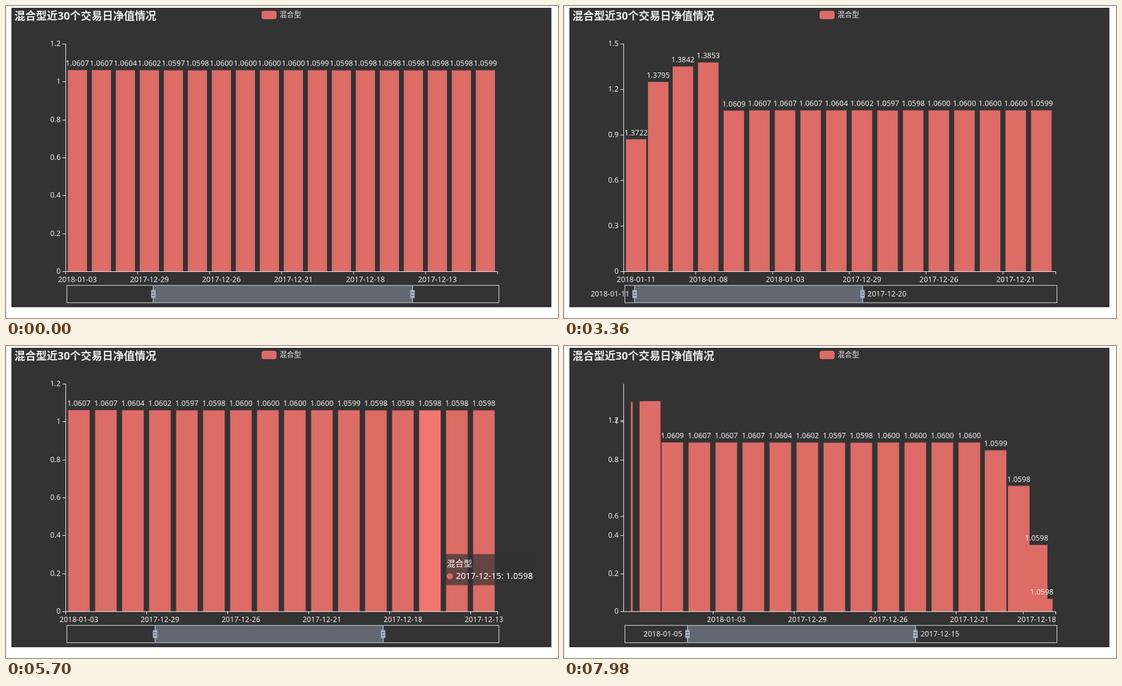
Recreate the animation shown at these times as an HTML page with a canvas. Size 920 by 521 pixels, loop 8000 ms.

```html
<!DOCTYPE html>
<html lang="zh">
<head>
<meta charset="utf-8">
<style>
  html, body { margin: 0; width: 100%; height: 100%; overflow: hidden; background: #fff; }
  canvas { display: block; }
</style>
</head>
<body>
<canvas id="stage" width="920" height="521"></canvas>
<script>
const g = document.getElementById('stage').getContext('2d');
const LOOP = 8000;
const X0 = 99, W = 720, Y0 = 443, H = 380;
const SLIDE = 101.5, MID = 481;
const RED = '#dd6b66', HOT = '#f37570', INK = '#eee', HANDLE = '#a7b7cc';
const FONT = '"Noto Sans", "Noto Sans CJK SC", "Noto Sans CJK", sans-serif';

const days = ('01-11 01-10 01-09 01-08 01-05 01-04 01-03 01-02 12-31 12-29 12-28 12-27 12-26 ' +
  '12-25 12-22 12-21 12-20 12-19 12-18 12-15 12-14 12-13 12-12 12-11 12-08 ' +
  '12-07 12-06 12-05 12-04 12-01').split(' ');
const date = i => (days[i] < '02' ? '2018-' : '2017-') + days[i];
const head = [1.3722, 1.3795, 1.3842, 1.3853, 1.0609, 1.0607, 1.0607, 1.0607, 1.0604, 1.0602, 1.0597, 1.0598];
const value = i => i < 12 ? head[i] : i < 16 ? 1.06 : i === 16 || i > 22 ? 1.0599 : 1.0598;

// Piecewise linear paths: time, value, time, value, ...
function path(p, t) {
  if (t <= p[0]) return p[1];
  for (let i = 2; i < p.length; i += 2) {
    if (t < p[i]) return p[i - 1] + (p[i + 1] - p[i - 1]) * (t - p[i - 2]) / (p[i] - p[i - 2]);
  }
  return p[p.length - 1];
}
const LEFT = [2560, 245.5, 2650, 228, 2758, 203, 2867, 178, 2975, 150, 3084, 127, 3193, 112.5,
  3270, 110.5, 3300, 112, 3360, 117.5, 3900, 166, 4175, 180, 4270, 244, 4340, 248.5,
  6240, 248.5, 6310, 242, 6380, 203, 6452, 184, 6524, 159, 6600, 130.5, 6680, 120, 6884, 108,
  6956, 103, 7000, 101.5, 7500, 101.5, 7660, 117, 7735, 128, 7810, 149, 7885, 174, 7960, 199,
  7980, 205.5, 8000, 211];
const RIGHT = [1440, 677.5, 1528, 686.5, 1680, 707.5, 1780, 709, 1900, 698, 2100, 667,
  2212, 648, 2340, 629.5, 2420, 625.5];
const left = t => path(LEFT, t);
const right = t => t < 2420 ? path(RIGHT, t) : left(t) + 380;

// Tooltip visits: time span, pointer x, box left, box top
const tips = [
  { on: 300, off: 560, mouse: [300, 585, 540, 612], x: [300, 605, 540, 622], y: [300, 330, 540, 405] },
  { on: 4560, off: 5880,
    mouse: [4560, 330, 4740, 215, 4860, 170, 5100, 190, 5580, 700, 5880, 722],
    x: [4560, 370, 4740, 301, 4900, 225, 5100, 205, 5600, 725, 5880, 738],
    y: [4560, 300, 4740, 254, 5000, 220, 5500, 300, 5880, 390] }
];
const sliderHot = t => t >= 560 && t < 4480 || t >= 5880;

// Throttled chart updates while dragging: first, step, last
const updates = [];
for (const [a, step, b] of [[1528, 85.5, 2130], [2214.25, 108.75, 4500], [6308, 73.5, 6980], [7660, 75, 7965]]) {
  for (let t = a; t <= b; t += step) updates.push(t);
}

// Tweens over arrays of numbers, cubic out
function at(o, t) {
  const r = Math.pow(1 - Math.min(1, (t - o.t) / o.d), 3);
  return o.b.map((b, i) => b + (o.a[i] - b) * r);
}
function aim(map, key, to, t, from = to) {
  const o = map.get(key);
  map.set(key, o ? { a: at(o, t), b: to, t, d: 300 } : { a: from, b: to, t, d: 1000 });
}
function keep(map, keys) {
  for (const k of [...map.keys()]) if (!keys.has(k)) map.delete(k);
}

function zoom(s, t) {
  const idx = x => Math.round((x - SLIDE) / W * 29);
  const from = idx(left(t)), to = idx(right(t));
  const band = W / (to - from + 1);
  const max = from < 4 ? 1.5 : 1.2, step = from < 4 ? 3 : 2;
  s.from = from;
  s.band = band;
  for (const [i, o] of s.bars) {
    if (i >= from && i <= to) continue;
    const a = at(o, t);
    s.gone.push({ i, a, b: [a[0], 0, a[2]], t, d: 300 });
    s.bars.delete(i);
  }
  const xs = new Set(), ys = new Set();
  for (let i = from; i <= to; i++) {
    const x = X0 + (i - from) * band, h = value(i) / max * H;
    aim(s.bars, i, [x + band * .1, band * .8, h], t, [x + band * .1, band * .8, 0]);
    if (i % 3 === 0) {
      xs.add(i);
      aim(s.xt, i, [x, x + band / 2], t);
    }
  }
  for (let k = 0; k <= max * 10 + .01; k += step) {
    ys.add(k);
    aim(s.yt, k, [Y0 - k / 10 / max * H], t);
  }
  keep(s.xt, xs);
  keep(s.yt, ys);
}

function stateAt(t) {
  const s = { bars: new Map(), xt: new Map(), yt: new Map(), gone: [] };
  zoom(s, -2000);
  for (const u of updates) if (u <= t) zoom(s, u);
  return s;
}

function text(str, x, y, align = 'center', size = 12.4, color = INK, weight = '') {
  g.font = `${weight} ${size}px ${FONT}`;
  g.textAlign = align;
  g.textBaseline = 'middle';
  g.fillStyle = color;
  g.fillText(str, x, y);
}
function box(x, y, w, h, color, r = 0) {
  g.fillStyle = color;
  g.beginPath();
  g.roundRect(x, y, w, h, r);
  g.fill();
}
const px = Math.round;

function axes(s, t) {
  box(X0, 63, 1, H + 1, INK);
  box(X0, Y0, W + 1, 1, INK);
  box(X0 + W, Y0, 1, 5, INK);
  for (const [i, o] of s.xt) {
    const [x, mid] = at(o, t);
    box(px(x), Y0, 1, 5, INK);
    text(date(i), mid, 457.5);
  }
  for (const [k, o] of s.yt) {
    const [y] = at(o, t);
    box(94, px(y), 5, 1, INK);
    text(String(k / 10), 91, y + .5, 'right');
  }
}

function bars(s, t, hot) {
  const list = s.gone.filter(o => t < o.t + o.d).map(o => [o.i, o, true]);
  for (const [i, o] of s.bars) list.push([i, o, false]);
  list.sort((a, b) => a[0] - b[0]);
  for (const [i, o, dead] of list) {
    const [x, w, h] = at(o, t);
    box(x, Y0 - h, w, h, i === hot ? HOT : RED);
    if (!dead) text(value(i).toFixed(4), x + w / 2, Y0 - h - 10.5);
  }
}

function handle(x) {
  box(x - .8, 466, 1.6, 30, HANDLE);
  box(x - 3.7, 474.5, 7.4, 13, HANDLE);
  box(x - 2.2, 478.1, 4.3, 1.2, '#444a52');
  box(x - 2.2, 482.7, 4.3, 1.2, '#444a52');
}

function slider(t) {
  const a = left(t), b = right(t);
  g.strokeStyle = '#ddd';
  g.lineWidth = 1;
  g.strokeRect(SLIDE, 466.5, W - .5 + .5, 29);
  box(a, 466, b - a, 30, 'rgba(167,183,204,.4)');
  handle(a);
  handle(b);
}

function tooltip(tip, i, t) {
  const x = path(tip.x, t), y = path(tip.y, t);
  box(x, y, 154, 52, 'rgba(50,50,50,.7)', 4);
  text('混合型', x + 5, y + 16, 'left', 14, '#fff');
  box(x + 5, y + 32, 10, 10, RED, 5);
  text(`${date(i)}: ${value(i).toFixed(4)}`, x + 20, y + 37, 'left', 14.5, '#fff');
}

function draw(t) {
  const s = stateAt(t);
  const tip = tips.find(p => t >= p.on && t < p.off);
  const hot = tip ? s.from + Math.floor((path(tip.mouse, t) - X0) / s.band) : -1;

  box(0, 0, 920, 521, '#fff');
  box(0, 0, 1, 521, '#dfe3ea');
  box(9, 3, 900, 500, '#333');
  axes(s, t);
  bars(s, t, hot);
  text('混合型近30个交易日净值情况', 14, 18, 'left', 18, INK, 'bold');
  box(426, 8, 25, 14, RED, 4);
  text('混合型', 456, 15.5, 'left', 12);
  slider(t);
  if (sliderHot(t)) {
    const [a, b] = [s.from, s.from + px(W / s.band) - 1];
    text(date(a), left(t) - 8.5, MID + .5, 'right');
    text(date(b), right(t) + 8.5, MID + .5, 'left');
  }
  if (tip) tooltip(tip, hot, t);
}

const start = performance.now();
function tick() {
  draw((performance.now() - start) % LOOP);
  requestAnimationFrame(tick);
}
tick();
</script>
</body>
</html>
```
